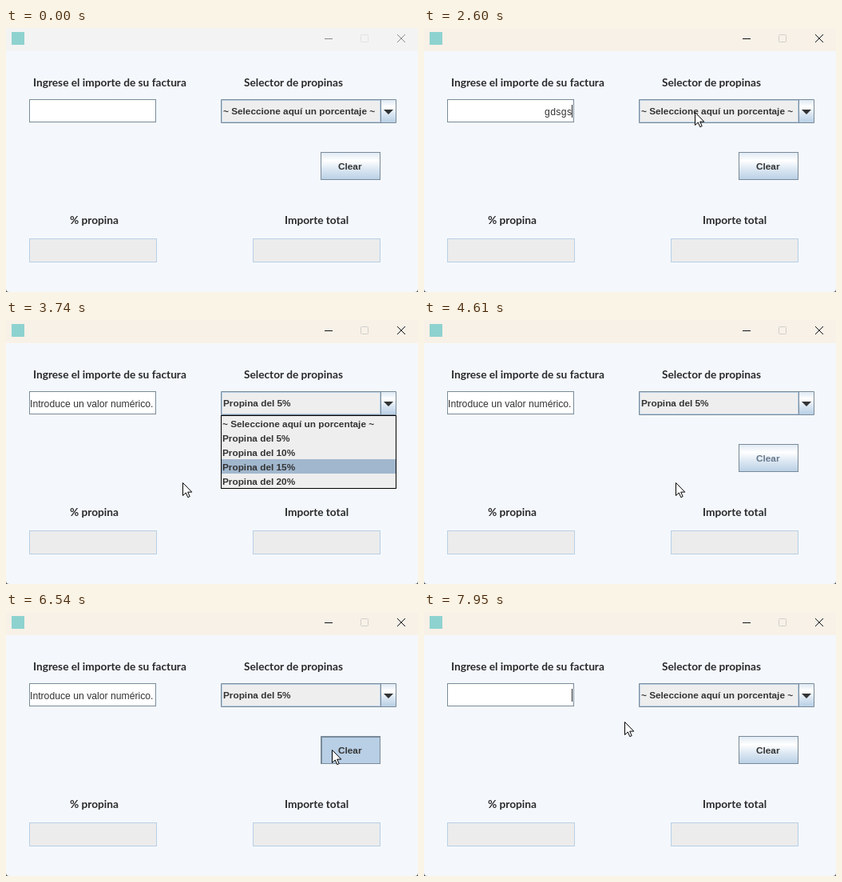
Recreate the animation shown at these times as an HTML page. Size 516 by 330 pixels, loop 8 s.

```html
<!DOCTYPE html>
<html lang="es">
<head>
<meta charset="utf-8">
<title>Calculadora de propinas</title>
<style>
  html, body { margin: 0; width: 100%; height: 100%; overflow: hidden; background: #555; }
  svg { display: block; }
  text { white-space: pre; }
  .label { font: 700 13.7px Lato, sans-serif; fill: #2a2a2a; }
  .bold { font: 700 11.8px "Liberation Sans", Arial, sans-serif; fill: #333; }
  .plain { font: 12.2px "Liberation Sans", Arial, sans-serif; fill: #333; }
  .typed { letter-spacing: .4px; text-anchor: end; }
  .line { fill: none; stroke: #7a8a99; }
  .soft { fill: none; stroke: #b8cfe5; }
  .off { fill: #ececec; stroke: #b8cfe5; }
</style>
</head>
<body>
<svg width="516" height="330" viewBox="0 0 516 330">
  <defs>
    <linearGradient id="steel" x2="0" y2="1">
      <stop stop-color="#dde8f3"/>
      <stop offset=".3" stop-color="#fff"/>
      <stop offset=".6" stop-color="#dde8f3"/>
      <stop offset="1" stop-color="#b8cfe5"/>
    </linearGradient>
    <clipPath id="frame"><path d="M0 0H516V326Q516 330 512 330H4Q0 330 0 326Z"/></clipPath>
  </defs>
  <g clip-path="url(#frame)">
    <rect width="516" height="330" fill="#f4f8fd"/>
    <rect id="bar" width="516" height="29"/>
    <rect x="7" y="5" width="16" height="16" fill="#8ed2cf"/>
    <path id="controls" d="M399 13.500H409M490 8L500 18M500 8L490 18"/>
    <rect id="maximize" x="444.500" y="8.500" width="9" height="9" rx="1" fill="none"/>

    <text class="label" x="34" y="73">Ingrese el importe de su factura</text>
    <text class="label" x="298" y="73">Selector de propinas</text>
    <text class="label" x="80" y="245">% propina</text>
    <text class="label" x="349" y="245">Importe total</text>

    <rect x="29.500" y="89.500" width="158" height="28" fill="#fff" stroke="#7a8a99"/>
    <text id="typed" class="plain typed" x="185.500" y="109"></text>
    <text id="message" class="plain" x="30" y="109">Introduce un valor numérico.</text>
    <path id="caret" d="M185.500 96V112" stroke="#222"/>

    <rect x="269" y="89" width="220" height="30" fill="#eee"/>
    <rect x="469" y="90" width="20" height="28" fill="url(#steel)"/>
    <rect class="soft" x="270.500" y="90.500" width="198" height="27"/>
    <path class="line" d="M269.500 89.500H488.500V118.500H269.500ZM469.500 90V118"/>
    <path d="M473 102H485L479 108Z" fill="#333"/>
    <text id="choice" class="bold" x="272" y="108"></text>

    <rect id="face" x="394" y="155" width="75" height="35"/>
    <rect class="line" x="394.500" y="155.500" width="74" height="34"/>
    <path id="sunk" class="line" d="M395 156.500H468M395.500 156V189"/>
    <rect id="focus" x="415.500" y="163.500" width="31" height="17" fill="none" stroke="#a3b8cc"/>
    <text id="clear" class="bold" x="416" y="177">Clear</text>

    <rect class="off" x="29.500" y="263.500" width="159" height="29"/>
    <rect class="off" x="309.500" y="263.500" width="159" height="29"/>

    <g id="popup">
      <rect x="269.500" y="119.500" width="219" height="91" fill="#eee" stroke="#000"/>
      <rect id="mark" x="270" width="218" height="18" fill="#a1b7cd"/>
    </g>

    <circle id="ring" cy="-1" r="12" fill="#e8e63c" opacity=".75"/>
    <path id="arrow" d="M.5 .5V16.500L4.300 13L6.800 18.700L9.200 17.600L6.700 12.100H11.800Z" fill="#fff" stroke="#000"/>
    <path id="beam" d="M-3 -8H-1L0 -7L1 -8H3M0 -7V7M-3 8H-1L0 7L1 8H3" fill="none" stroke="#222"/>
  </g>
</svg>
<script>
const LOOP = 8000, FPS = 15;
const OPTIONS = ["~ Seleccione aquí un porcentaje ~"];
for (let n = 5; n <= 20; n += 5) OPTIONS.push(`Propina del ${n}%`);

const PLACES = {
  below: [300, 340], outside: [-30, 125], field: [65, 102], combo: [339, 105],
  option: [349, 154], aside: [205, 209], gap: [315, 203], button: [416, 174],
  center: [422, 170], message: [127, 109], rest: [251, 137]
};

// Pointer moves in ticks: begin, end, destination
const MOVES = [
  [0, 6, "field"], [9, 13, "outside"], [32, 38, "combo"], [42, 45, "option"],
  [52, 58, "aside"], [65, 69, "gap"], [69, 77, "button"], [88, 93, "message"],
  [93, 99, "button"], [102, 104, "center"], [107, 112, "field"], [114, 119, "rest"]
];

// Button events in ticks
const CLICK = { field: 7, combo: 40, option: 47, clear: 104, again: 112 };

const ui = {};
document.querySelectorAll("[id]").forEach(el => ui[el.id] = el);

OPTIONS.forEach((label, i) => {
  const row = document.createElementNS("http://www.w3.org/2000/svg", "text");
  row.setAttribute("class", "bold");
  row.setAttribute("x", 271);
  row.setAttribute("y", 134 + 18 * i);
  row.textContent = label;
  ui.popup.append(row);
});

const clamp = (v, min, max) => Math.min(max, Math.max(min, v));
const within = (k, from, to) => k >= from && k < to;
const show = (el, on) => el.setAttribute("visibility", on ? "visible" : "hidden");
const place = (el, x, y) => el.setAttribute("transform", `translate(${x} ${y})`);
const inBox = ([x, y], left, top, right, bottom) => within(x, left, right) && within(y, top, bottom);

function pointer(k) {
  let pos = PLACES.below;
  for (const [begin, end, name] of MOVES) {
    const p = clamp((k - begin) / (end - begin), 0, 1);
    const eased = p * (2 - p);
    pos = pos.map((v, i) => v + (PLACES[name][i] - v) * eased);
  }
  return pos.map(Math.round);
}

function hoveredRow(k) {
  let row = 0;
  for (let j = CLICK.combo; j <= k; j++) {
    const pos = pointer(j);
    if (inBox(pos, 269, 120, 489, 210)) row = Math.floor((pos[1] - 120) / 18);
  }
  return row;
}

function draw(k) {
  const pos = pointer(k);
  const active = k >= CLICK.field;
  ui.bar.setAttribute("fill", active ? "#f8f1e7" : "#f3f3f3");
  ui.controls.setAttribute("stroke", active ? "#111" : "#888");
  ui.maximize.setAttribute("stroke", active ? "#cfcfcc" : "#e2e2e2");

  const chosen = within(k, CLICK.option, CLICK.clear);
  const letters = clamp(Math.floor((k - 22) / 1.9), 0, 5);
  ui.typed.textContent = k < CLICK.option ? "gdsgs".slice(0, letters) : "";
  ui.choice.textContent = OPTIONS[chosen ? 1 : 0];
  show(ui.message, chosen);

  const focused = within(k, 8, CLICK.combo) || k > CLICK.again;
  show(ui.caret, focused && Math.floor((k - 8) / 7.5) % 2 === 0);

  const open = within(k, CLICK.combo + 1, 62);
  show(ui.popup, open);
  if (open) ui.mark.setAttribute("y", 120 + 18 * hoveredRow(k));

  const pressed = within(k, 88, 107) && inBox(pos, 394, 155, 469, 190);
  ui.face.setAttribute("fill", pressed ? "#b8cfe5" : "url(#steel)");
  show(ui.sunk, pressed);
  show(ui.focus, within(k, CLICK.clear, CLICK.again));
  ui.clear.style.fill = within(k, 62, 76) ? "#66788c" : "";

  show(ui.ring, Object.values(CLICK).some(c => within(k, c, c + 2)));
  const inField = inBox(pos, 30, 90, 188, 118);
  show(ui.arrow, !inField);
  show(ui.beam, inField);
  for (const el of [ui.ring, ui.arrow, ui.beam]) place(el, ...pos);
}

const start = performance.now();
let last = -1;
function tick(now) {
  const t = Math.max(0, now - start) % LOOP;
  const k = Math.min(119, Math.floor((t + 10) * FPS / 1000));
  if (k !== last) draw(last = k);
  requestAnimationFrame(tick);
}
tick(start);
</script>
</body>
</html>
```
